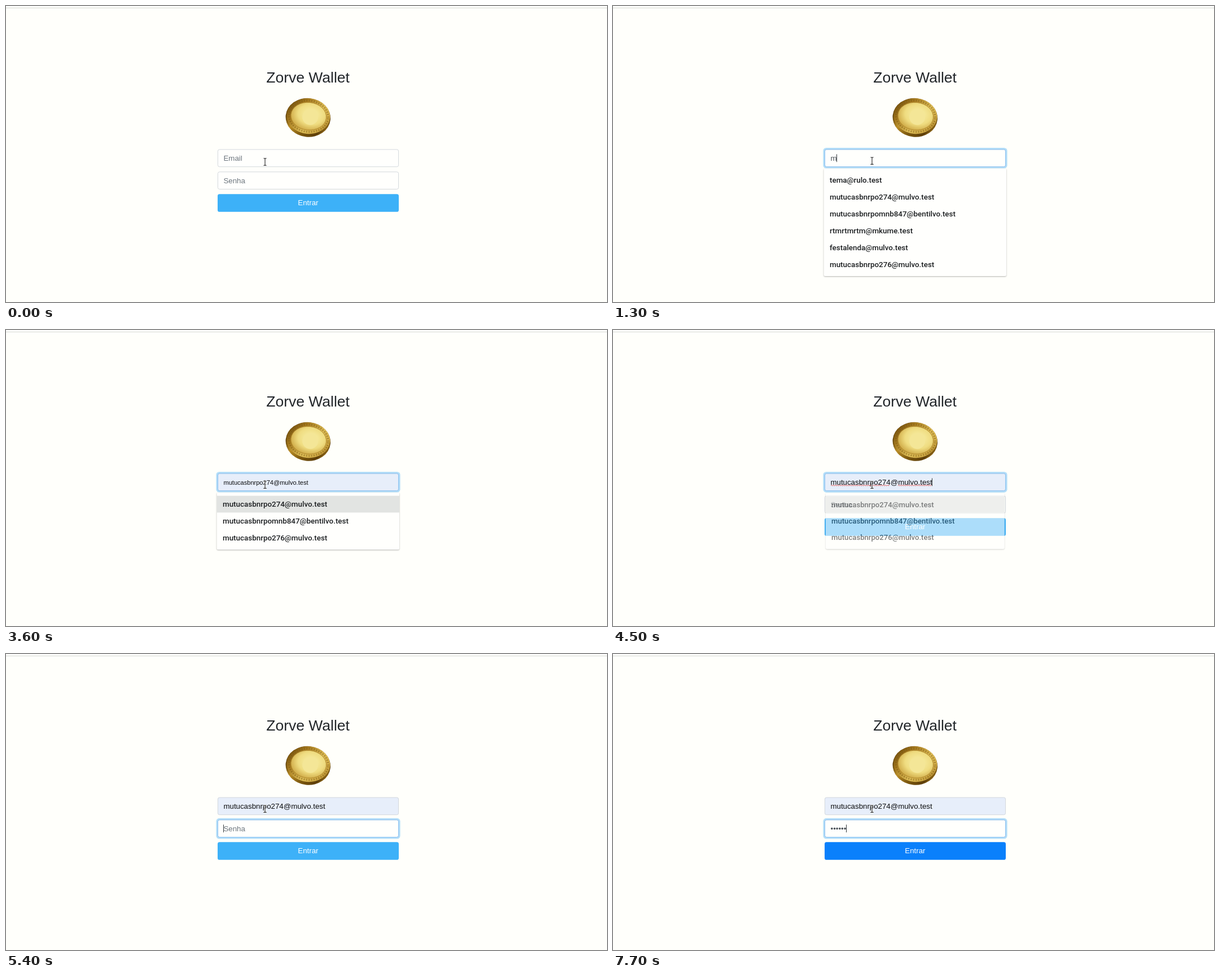
Recreate the animation shown at these times as an HTML page. Size 1065 px wide and 526 px high, loop 8 s.

```html
<!DOCTYPE html>
<html lang="pt-BR">
<head>
<meta charset="utf-8">
<title>Zorve Wallet</title>
<style>
  html, body { margin: 0; width: 100%; height: 100%; overflow: hidden; background: #fffffb; }
  svg { display: block; width: 1065px; height: 526px; font: 13.27px "Liberation Sans", Arial, sans-serif; }
  .field { fill: #fffffd; stroke: #ced4da; stroke-width: .9; }
  .ring { fill: #b3def9; }
  .focus { fill: none; stroke: #7dbdf6; stroke-width: .9; }
  .mid { text-anchor: middle; }
  #title { font-size: 26.5px; fill: #212529; }
  #panel { fill: #fffffd; filter: drop-shadow(0 1px 1px rgba(0, 0, 0, .3)); }
  #list text { font: 500 13.4px Roboto, "Open Sans", sans-serif; fill: #1b1e20; }
  #wave { fill: none; stroke: #e0443e; stroke-width: .9; }
  #caret { fill: #33383c; }
  #mouse { fill: none; }
</style>
</head>
<body>
<svg viewBox="0 0 1065 526">
  <defs>
    <linearGradient id="edge" x1="0" y1=".2" x2="1" y2=".8">
      <stop offset="0" stop-color="#8a6414"/>
      <stop offset=".13" stop-color="#5e3f08"/>
      <stop offset=".35" stop-color="#b98d28"/>
      <stop offset=".6" stop-color="#7d590f"/>
      <stop offset=".85" stop-color="#5d3e08"/>
      <stop offset="1" stop-color="#b98c28"/>
    </linearGradient>
    <linearGradient id="rim" x1="0" y1=".2" x2="1" y2=".8">
      <stop offset="0" stop-color="#6d4b0c"/>
      <stop offset=".25" stop-color="#a67a1e"/>
      <stop offset=".6" stop-color="#dfbf58"/>
      <stop offset=".85" stop-color="#d2ad47"/>
      <stop offset="1" stop-color="#9a7019"/>
    </linearGradient>
    <radialGradient id="face" cx=".57" cy=".42" r=".62">
      <stop offset="0" stop-color="#f9f1ab"/>
      <stop offset=".6" stop-color="#efdc80"/>
      <stop offset="1" stop-color="#cda743"/>
    </radialGradient>
    <path id="beam" d="M-2.6-6.2h1.9l.7.7.7-.7h1.9M0-5.5v11M-2.6 6.2h1.9l.7-.7.7.7h1.9"/>
  </defs>

  <rect y="3" width="1065" height="1" fill="#d6d9d6"/>
  <text id="title" class="mid" x="535.1" y="136">Zorve Wallet</text>

  <g transform="rotate(6 535 198)">
    <ellipse cx="535.3" cy="198.2" rx="39.8" ry="34.4" fill="url(#edge)"/>
    <ellipse cx="535.6" cy="195.6" rx="38.6" ry="31.4" fill="url(#rim)"/>
    <ellipse cx="535.8" cy="195.7" rx="34.8" ry="27.8" fill="none"
      stroke="#7a5712" stroke-opacity=".45" stroke-width="3.4" stroke-dasharray="2.4 2"/>
    <ellipse cx="536" cy="195.8" rx="31.5" ry="24.6" fill="url(#face)" stroke="#a47c23" stroke-width=".8"/>
    <circle cx="539" cy="197" r="14" fill="#f4e697"/>
  </g>

  <rect id="mailRing" class="ring" x="372.4" y="252" width="326.2" height="36.7" rx="5.5"/>
  <rect id="mailBox" class="field" x="375.4" y="255" width="320.2" height="30.7" rx="3"/>
  <rect id="mailFocus" class="focus" x="375.4" y="255" width="320.2" height="30.7" rx="3"/>
  <text id="mail" x="385.5" y="274.8"></text>
  <path id="wave"/>

  <rect id="passRing" class="ring" x="372.4" y="291.8" width="326.2" height="36.7" rx="5.5"/>
  <rect class="field" x="375.4" y="294.8" width="320.2" height="30.7" rx="3"/>
  <rect id="passFocus" class="focus" x="375.4" y="294.8" width="320.2" height="30.7" rx="3"/>
  <text id="pass" x="385.5" y="314.6"></text>

  <rect id="button" x="375" y="334.3" width="321" height="31.5" rx="3.4"/>
  <text class="mid" x="535.4" y="354.4" fill="#fff">Entrar</text>
  <rect id="caret" width="1" height="13.8"/>

  <g id="list">
    <rect id="panel" x="373.6" y="288.6" width="323.4" rx="2.5"/>
    <rect id="pick" x="373.6" y="294.6" width="323.4" height="29.8" fill="#e2e4e2"/>
  </g>

  <g id="mouse">
    <use href="#beam" stroke="#fff" stroke-width="2.4"/>
    <use href="#beam" stroke="#222" stroke-width="1.1"/>
  </g>
</svg>
<script>
const LOOP = 8000, ROW = 29.9, LEFT = 385.5;
const $ = id => document.getElementById(id);
const set = (id, attrs) => {
  for (const key in attrs) $(id).setAttribute(key, attrs[key]);
};

const address = "mutucasbnrpo274@mulvo.test";
const contacts = [
  "tema@rulo.test", address, "mutucasbnrpomnb847@bentilvo.test",
  "rtmrtmrtm@mkume.test", "festalenda@mulvo.test", "mutucasbnrpo276@mulvo.test"
];
const mailKeys = [1300, 1500, 1900, 2100, 2400, 2600, 3000];
const passKeys = [6200, 6700, 6900, 7100, 7200, 7700];
const caretOff = [[0, 500], [1000, 1300], [3300, 4400], [5000, 5300], [5700, 6200]];

const count = (keys, t) => keys.filter(k => t >= k).length;
const ramp = (t, a, b) => Math.min(1, Math.max(0, (t - a) / (b - a)));

const rows = contacts.map(name => {
  const row = document.createElementNS("http://www.w3.org/2000/svg", "text");
  row.textContent = name;
  row.setAttribute("x", 384);
  $("list").append(row);
  return row;
});

function squiggle(from, to) {
  let d = `M${from} 277`;
  for (let x = from + 1.7, up = true; x < to; x += 1.7, up = !up) d += `L${x} ${up ? 275.4 : 277}`;
  return d;
}
set("wave", { d: squiggle(386, 491) + squiggle(505, 565) });

function drawMail(t, focus) {
  const typed = count(mailKeys, t), preview = t >= 3600 && t < 4400;
  const filled = t >= 3600;
  $("mail").textContent = filled ? address : address.slice(0, typed) || "Email";
  $("mail").style.fontSize = preview ? "11.05px" : "13.27px";
  $("mailBox").style.fill = filled ? "#e7eefa" : "#fffffd";
  set("mail", { fill: filled ? "#0b0c0d" : typed ? "#495057" : "#6c757d" });
  set("mailRing", { opacity: focus });
  set("mailFocus", { opacity: focus });
  set("wave", { opacity: t >= 4400 && t < 5300 ? 1 : 0 });
}

function drawPass(t, focus) {
  const typed = count(passKeys, t);
  $("pass").textContent = "•".repeat(typed) || "Senha";
  set("pass", { fill: typed ? "#495057" : "#6c757d" });
  set("passRing", { opacity: focus });
  set("passFocus", { opacity: focus });
  set("button", { fill: t >= 7700 ? "#0a80fb" : "#3db1f8" });
}

function drawCaret(t) {
  const inPass = t >= 5300;
  const empty = inPass ? t < 6200 : t < 1300;
  const width = empty ? 0 : $(inPass ? "pass" : "mail").getComputedTextLength();
  const hidden = caretOff.some(([a, b]) => t >= a && t < b);
  set("caret", {
    x: Math.round(LEFT + width - .5),
    y: inPass ? 303.2 : 263.4,
    opacity: hidden ? 0 : 1
  });
}

function drawList(t) {
  const query = t < 1500 ? "m" : t < 2100 ? "mu" : "mutu";
  let n = 0;
  rows.forEach((row, i) => {
    const show = contacts[i].includes(query);
    row.style.display = show ? "" : "none";
    if (show) row.setAttribute("y", 314.2 + ROW * n++);
  });
  const height = ROW * n + 12;
  const alpha = ramp(t, 400, 600) * (1 - ramp(t, 4350, 4700));
  const scale = 1 - .0465 * (1 - alpha);
  const cy = 288.6 + height / 2;
  set("panel", { height });
  set("pick", { opacity: t >= 3600 ? 1 : 0 });
  set("list", {
    opacity: alpha,
    transform: `translate(535.3 ${cy}) scale(${scale}) translate(-535.3 ${-cy})`
  });
}

function draw(now) {
  const t = Math.floor(now % LOOP / 100) * 100;
  const shift = ramp(t, 5200, 5400);
  drawMail(t, ramp(t, 400, 600) * (1 - shift));
  drawPass(t, shift);
  drawCaret(t);
  drawList(t);
  set("mouse", { transform: `translate(459 ${t < 200 ? 277 : 275.2})` });
}

const start = performance.now();
function tick() {
  draw(performance.now() - start);
  requestAnimationFrame(tick);
}
tick();
</script>
</body>
</html>
```
